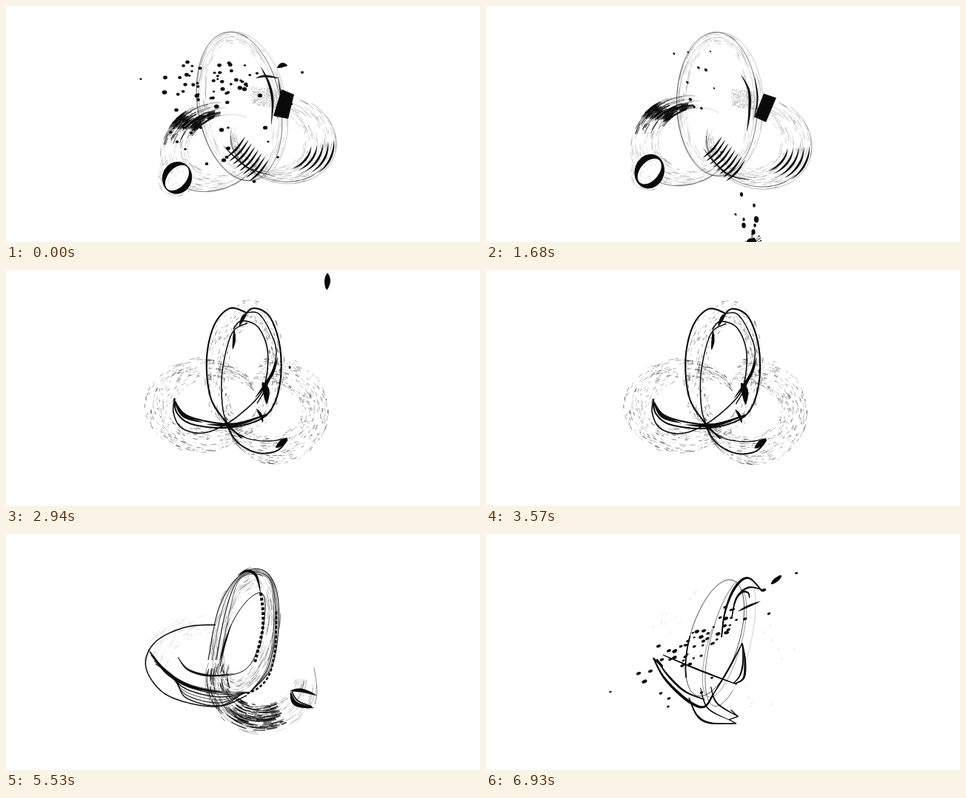
These frames come from a looping animation (640x320 px, 7.07 s). An HTML page with a canvas:

```html
<!DOCTYPE html>
<html lang="en">
<head>
<meta charset="utf-8">
<title>Ink knot</title>
<style>
html, body { margin: 0; width: 100%; height: 100%; overflow: hidden; background: #fff; }
canvas { display: block; width: 640px; height: 320px; }
</style>
</head>
<body>
<canvas id="stage" width="640" height="320"></canvas>
<script>
const ctx = document.getElementById('stage').getContext('2d');
const LOOP = 7070, INK = '#0a0a0a';
// Hold of each drawing in units of 70 ms
const holds = '222223232232222322232222242222232322222322232';
const starts = [];
[...holds].reduce((t, h) => (starts.push(t), t + h * 70), 0);

let seed = 1;
const rnd = () => {
  seed = (seed * 1664525 + 1013904223) >>> 0;
  return seed / 4294967296;
};
const bell = () => (rnd() + rnd() + rnd()) / 1.5 - 1;
const mix = (a, b, u) => a.map((v, i) => v + (b[i] - v) * u);
const rad = d => d * Math.PI / 180;
const pairs = p => p.filter((v, i) => i % 2 === 0).map((v, i) => [v, p[2 * i + 1]]);

// Point of a tilted ellipse [cx, cy, rx, ry, tilt]
function at(e, deg) {
  const a = rad(deg), r = rad(e[4]);
  const x = e[2] * Math.cos(a), y = e[3] * Math.sin(a);
  return [e[0] + x * Math.cos(r) - y * Math.sin(r), e[1] + x * Math.sin(r) + y * Math.cos(r)];
}

function arc(e, a0, a1) {
  const n = Math.max(2, Math.ceil(Math.abs(a1 - a0) / 6)), out = [];
  for (let i = 0; i <= n; i++) out.push(at(e, a0 + (a1 - a0) * i / n));
  return out;
}

// Smooth path through a flat list of coordinates
function spline(p) {
  const pts = pairs(p), n = pts.length, out = [];
  const q = i => pts[Math.min(n - 1, Math.max(0, i))];
  for (let i = 0; i < n - 1; i++) {
    const [a, b, c, d] = [q(i - 1), q(i), q(i + 1), q(i + 2)];
    for (let k = 0; k < 8; k++) {
      const u = k / 8;
      out.push(b.map((v, j) => v + 0.5 * u * (c[j] - a[j] +
        u * (2 * a[j] - 5 * v + 4 * c[j] - d[j] + u * (3 * (v - c[j]) + d[j] - a[j])))));
    }
  }
  out.push(q(n - 1));
  return out;
}

function trace(pts, w, alpha = 1) {
  ctx.globalAlpha = alpha;
  ctx.lineWidth = w;
  ctx.beginPath();
  pts.forEach(p => ctx.lineTo(p[0], p[1]));
  ctx.stroke();
  ctx.globalAlpha = 1;
}
const line = (p, w, alpha) => trace(spline(p), w, alpha);

function fill(pts, color = INK) {
  ctx.fillStyle = color;
  ctx.beginPath();
  pts.forEach(p => ctx.lineTo(p[0], p[1]));
  ctx.fill();
}

// Stroke that swells in the middle
function taper(pts, w) {
  const n = pts.length - 1, left = [], right = [];
  pts.forEach((p, i) => {
    const a = pts[Math.max(0, i - 1)], b = pts[Math.min(n, i + 1)];
    const dx = b[0] - a[0], dy = b[1] - a[1], d = Math.hypot(dx, dy) || 1;
    const h = w / 2 * Math.sin(Math.PI * i / n);
    left.push([p[0] - dy / d * h, p[1] + dx / d * h]);
    right.unshift([p[0] + dy / d * h, p[1] - dx / d * h]);
  });
  fill(left.concat(right));
}
const brush = (p, w) => taper(spline(p), w);

// Short strokes scattered in the band between two ellipses
function hatch(out, inn, a0, a1, n, len, w, alpha, s) {
  seed = s;
  for (let i = 0; i < n; i++) {
    const e = mix(out, inn, rnd()), a = a0 + (a1 - a0) * rnd(), l = len * (0.3 + rnd());
    trace(arc(e, a, a + l), w * (0.5 + rnd()), alpha * (0.4 + 0.6 * rnd()));
  }
}

function ring(e, w, alpha) { trace(arc(e, 0, 360), w, alpha); }

function drop(x, y, r, stretch, ang) {
  ctx.fillStyle = INK;
  ctx.beginPath();
  ctx.ellipse(x, y, r * stretch, r, ang, 0, 7);
  ctx.fill();
}

// Wide ink knot
function inkKnot(t) {
  const u = t / 1050;
  const U = mix([315, 136, 56, 102, -10], [313, 134, 55, 99, -4], u);
  const L = mix([278, 192, 74, 60, -25], [270, 186, 74, 61, -22], u);
  const l = mix([293, 186, 50, 36, -25], [285, 181, 50, 38, -22], u);
  const R = mix([374, 180, 73, 60, 15], [370, 183, 73, 62, 18], u);
  const r = mix([357, 180, 46, 38, 20], [354, 181, 46, 38, 20], u);
  const C = mix([231, 233, 20, 22, 15], [224, 227, 20, 23, 15], u);
  const big = [U[0] + 4, U[1], U[2] + 4, U[3], U[4]];
  const small = [U[0], U[1], U[2] - 14, U[3] - 16, U[4]];

  hatch(L, l, 70, 290, 190, 14, 0.5, 0.42, 5);
  hatch(R, r, -85, 165, 330, 12, 0.5, 0.45, 9);
  hatch(big, small, 0, 360, 210, 12, 0.5, 0.36, 3);
  trace(arc(R, -70, 160), 0.5, 0.55);
  trace(arc(mix(R, r, 0.12), 25, 165), 0.7, 0.75);
  trace(arc(mix(L, l, 0.1), 45, 150), 0.8, 0.7);
  trace(arc(l, 180, 330), 0.4, 0.4);
  ring(U, 0.7, 0.8);
  ring(big, 0.4, 0.55);
  ring([U[0] - 1, U[1] + 3, U[2] - 3, U[3] - 4, U[4] + 2], 0.4, 0.4);

  hatch(L, l, 235, 250, 115, 13, 1.3, 1, 12);
  hatch(L, l, 213, 272, 65, 18, 0.9, 0.9, 21);
  hatch(mix(L, l, 0.55), l, 252, 275, 35, 14, 1.4, 1, 8);

  // Dotted shade and the dark block beside it
  seed = 44;
  ctx.fillStyle = '#999';
  for (let i = 0; i < 520; i++) {
    const x = rnd(), y = rnd();
    ctx.fillRect(331 + x * 36, 109 + x * 4 + y * 25 + u * 2, 0.7, 0.7);
  }
  fill(pairs(mix([372, 113, 389, 120, 381, 153, 361, 149], [374, 117, 391, 123, 379, 156, 362, 150], u)));

  for (let i = 0; i < 5; i++) taper(arc(mix(R, r, 0.08 + i * 0.17), -18 + i * 2, 34 + i * 3), 2.8);
  const dx = -3 * u;
  for (let i = 0; i < 8; i++) {
    const x = 297 + i * 4.5 + dx, y = 204 + i * 4.5;
    brush([x, y + 2, x + 14, y - 10, x + 26, y - 27], 2.8);
  }
  brush([292, 188 + 2 * u, 308, 204 + 5 * u, 330, 221 + 6 * u, 364, 231 + 4 * u], 1.8);
  brush([344, 82 + 7 * u, 355, 105 + 7 * u, 360 - 3 * u, 130 + 10 * u, 358 - 4 * u, 162 + 6 * u], 3.4);
  brush([367 + dx, 96, 371 + dx, 125, 366 + dx, 154], 2);

  hatch([C[0], C[1], 27, 27, 0], C, 0, 360, 45, 20, 0.5, 0.35, 7);
  fill(arc(C, 0, 360));
  const eye = [C[0], C[1], 20, 12.5, -50];
  fill(arc(eye, 0, 360), '#fff');
  hatch(eye, [C[0], C[1], 5, 3, -50], 0, 360, 45, 22, 0.4, 0.4, 6);
}

function pose(keys, t) {
  return t < 4410 ? mix(keys[0], keys[1], (t - 2310) / 2100) : mix(keys[1], keys[2], (t - 4410) / 2520);
}

// Carries points along with a triangle that goes from a to b
function warp(p, a, b) {
  const [ux, uy, vx, vy] = [a[2] - a[0], a[3] - a[1], a[4] - a[0], a[5] - a[1]];
  const det = ux * vy - uy * vx;
  return pairs(p).flatMap(([x, y]) => {
    const dx = x - a[0], dy = y - a[1];
    const m = (dx * vy - dy * vx) / det, n = (ux * dy - uy * dx) / det;
    return [0, 1].map(j => b[j] + m * (b[j + 2] - b[j]) + n * (b[j + 4] - b[j]));
  });
}

// Each part of the contour sketch: a triangle in three poses, and strokes in the first one
function part(keys, strokes) {
  return t => {
    const now = pose(keys, t);
    strokes.forEach(([w, p]) => {
      const q = warp(p, keys[0], now);
      line(q, w * 0.8);
      brush(q, w * 1.4);
    });
  };
}
const hood = part(
  [[297, 155, 303, 48, 349, 53], [303, 150, 320, 52, 358, 62], [318, 140, 346, 62, 373, 78]],
  [[2.4, [297, 155, 289, 115, 291, 75, 303, 48, 320, 41, 349, 53]],
    [2, [305, 115, 302, 85, 310, 68, 322, 65, 328, 72]],
    [1.8, [302, 94, 306, 72, 322, 55, 348, 50]]]);
const leaf = part(
  [[353, 126, 357, 180, 335, 203], [350, 137, 352, 190, 334, 202], [346, 148, 348, 195, 336, 203]],
  [[2.2, [353, 126, 360, 150, 357, 180, 335, 203]], [1.5, [353, 128, 355, 155, 348, 181, 332, 204]]]);
const stemKeys = [[353, 126, 337, 160, 322, 207], [350, 137, 332, 172, 310, 210], [346, 148, 327, 184, 301, 227]];
const stem = part(stemKeys, [[1.6, stemKeys[0]]]);
const browKeys = [[238, 205, 290, 210, 342, 202], [234, 187, 285, 197, 340, 203], [239, 164, 289, 185, 339, 204]];
const brow = part(browKeys, [[1.6, browKeys[0]]]);
const crest = part(
  [[232, 207, 283, 245, 332, 200], [225, 192, 272, 237, 318, 215], [226, 168, 271, 225, 307, 217]],
  [[2.8, [232, 207, 248, 232, 283, 245, 312, 237, 332, 200]],
    [2, [238, 205, 253, 221, 280, 231, 315, 222]], [2, [232, 207, 246, 212, 238, 205]]]);
const tailKeys = [[302, 221, 373, 241, 325, 239], [288, 221, 358, 249, 306, 245], [274, 222, 338, 257, 285, 246]];
const tail = part(tailKeys,
  [[1.4, [316, 205, 336, 222, 369, 233]], [2, [302, 221, 325, 239, 345, 245, 373, 241]],
    [1.2, [306, 208, 330, 229, 361, 238]]]);
const hook = [356, 227, 369, 233, 362, 238, 373, 241];

function sketchKnot(t) {
  const front = pose([[314, 132, 42, 82, 6], [314, 138, 37, 82, 8], [309, 141, 33, 82, 17]], t);
  const back = pose([[336, 135, 37, 91, 9], [335, 138, 33, 92, 10], [330, 146, 27, 90, 14]], t);
  const hole = pose([[328, 138, 27, 76, 6], [327, 140, 24, 75, 8], [322, 148, 22, 76, 16]], t);
  ring(front, 0.8, 0.9);
  trace(arc(front, 130, 175), 1.8);
  trace(arc(back, 45, 245), 0.7, 0.8);
  trace(arc(back, -115, 45), 0.5, 0.4);
  trace(arc(hole, -90, 190), 0.6, 0.7);
  [hood, leaf, stem, brow, crest, tail].forEach(f => f(t));
  trace(pairs(warp(hook, tailKeys[0], pose(tailKeys, t))), 1.4);
  seed = 77;
  for (let i = 0; i < 34; i++) {
    const e = [316, 160, 60 + rnd() * 48, 38 + rnd() * 60, 8], a = rnd() * 360;
    trace(arc(e, a, a + 3), 0.5, 0.25);
  }
  if (t < 2700) {
    brush([330, 238, 335, 252, 338, 270], 5);
    brush([332, 258, 331, 263, 330, 267], 2.5);
    brush([338, 155, 341, 151, 347, 146], 2.4);
  }
}

// Dashed rings under heavy contours
function ringKnot(t) {
  const s = (t - 2940) * -0.0025;
  ctx.save();
  ctx.translate(s, s * -0.5);
  hatch([265, 184, 78, 65, 0], [285, 181, 56, 33, -4], 50, 330, 470, 5, 0.7, 0.65, 31);
  hatch([366, 191, 70, 73, 0], [345, 187, 53, 37, 8], -110, 150, 500, 5, 0.7, 0.65, 32);
  hatch([322, 133, 54, 94, 5], [327, 139, 25, 67, 7], 0, 360, 520, 4, 0.7, 0.65, 33);
  line([325, 58, 302, 52, 281, 75, 271, 120, 276, 172, 296, 205, 318, 228], 2.1);
  line([326, 72, 305, 86, 292, 138, 293, 190, 303, 216], 1.5);
  line([319, 67, 333, 52, 355, 62, 369, 99, 371, 145, 361, 184, 340, 204, 297, 214, 251, 209, 231, 194, 227, 174], 2.1);
  line([307, 80, 318, 69, 340, 77, 353, 108, 351, 148, 339, 174, 302, 206, 266, 221, 237, 214, 226, 193, 228, 174], 1.6);
  line([228, 178, 242, 196, 275, 206, 311, 208, 352, 196], 2.2);
  line([325, 58, 341, 59, 356, 82, 365, 113, 354, 153, 339, 181], 1.4);
  line([296, 207, 313, 234, 340, 248, 366, 245, 380, 230], 1.9);
  line([299, 213, 325, 228, 354, 232, 380, 228], 1.3);
  brush([308, 80, 308, 95, 306, 108], 4);
  brush([325, 58, 320, 65, 315, 76], 5);
  brush([367, 118, 358, 143, 336, 174], 4);
  brush([346, 152, 351, 163, 352, 182], 9);
  brush([338, 188, 344, 197, 347, 207], 4);
  brush([364, 241, 373, 234, 380, 228], 8);
  brush([228, 180, 240, 198, 266, 207], 4);
  brush([270, 209, 308, 210, 350, 197], 4);
  ctx.restore();
}

// Dry brush sweep
function sweepKnot(t) {
  const s = (t - 5530) * -0.003;
  ctx.save();
  ctx.translate(s, 0);
  const B = [345, 200, 77, 73, 0], b = [345, 193, 46, 39, 0];
  hatch([323, 131, 45, 88, 12], [324, 135, 25, 64, 14], 0, 360, 330, 13, 0.55, 0.55, 51);
  hatch([275, 175, 89, 67, 0], [280, 178, 58, 43, 0], 175, 268, 85, 8, 0.5, 0.3, 52);
  hatch(B, b, 0, 190, 190, 14, 0.6, 0.5, 53);
  hatch(mix(B, b, 0.15), b, 60, 125, 160, 15, 1.1, 0.95, 54);
  hatch(B, b, 130, 190, 90, 15, 0.9, 0.9, 55);
  line([283, 123, 244, 126, 207, 142, 190, 165, 192, 190, 215, 217, 255, 231, 292, 233, 325, 219], 1.5);
  for (let i = 0; i < 6; i++) {
    const d = i * 4;
    line([192 + d * 0.5, 156 + d, 208 + d, 179 + d * 0.8, 243, 202 + d, 288, 213 + d, 329 - d * 0.4, 215],
      0.8 + (i % 3) * 0.4, 0.9);
  }
  brush([194, 158, 215, 186, 250, 207, 305, 217], 4.5);
  brush([232, 167, 246, 184, 275, 192, 309, 189], 3);
  line([232, 167, 246, 184, 275, 192, 309, 190, 329, 178, 343, 150], 1);
  for (let i = 0; i < 4; i++) {
    const d = i * 5.3, e = d * 0.4;
    line([273 + d, 171, 286 + d, 105, 307 + e, 65, 332, 48 + e, 354, 54 + e,
      367 - e, 85, 367 - e, 140, 357 - e, 184, 330, 214], i % 2 ? 0.7 : 1.2, 0.9);
  }
  line([289, 179, 303, 126, 325, 91, 345, 80, 350, 103, 343, 153], 1);
  brush([312, 57, 325, 50, 338, 57, 344, 82], 4);
  brush([288, 175, 295, 150, 304, 122], 2.5);
  ctx.setLineDash([4, 2.5]);
  line([344, 80, 347, 105, 346, 132, 336, 174], 4);
  line([365, 105, 364, 150, 357, 187, 343, 207, 324, 217], 2.6);
  ctx.setLineDash([]);
  line([416, 181, 420, 212, 417, 231], 0.7, 0.7);
  brush([383, 213, 399, 212, 420, 219], 5);
  brush([384, 214, 391, 230, 416, 236], 6);
  line([386, 214, 394, 226, 413, 234], 1.6);
  ctx.restore();
}

// Dots strewn around the line from (x0, y0) to (x1, y1)
function strew(n, x0, y0, x1, y1, sx, sy, s) {
  seed = s;
  return Array.from({ length: n }, () => {
    const u = rnd();
    return [x0 + (x1 - x0) * u + bell() * sx, y0 + (y1 - y0) * u + bell() * sy];
  });
}
const burst = strew(46, 235, 104, 330, 102, 22, 40, 17).concat(pairs([182, 99, 400, 90, 372, 82, 245, 76,
  215, 97, 214, 117, 230, 141, 231, 184, 222, 171, 240, 165, 250, 172, 242, 194, 300, 193, 291, 168,
  350, 165, 354, 184, 367, 205, 271, 214, 294, 209, 298, 205, 335, 238, 274, 152, 263, 165, 300, 165]));
const stray = pairs([249, 45, 268, 43, 298, 42, 282, 64, 292, 67, 303, 92, 267, 84, 271, 107,
  276, 117, 286, 119, 313, 179, 332, 263]);
const heavy = pairs([345, 226, 362, 241, 348, 260, 348, 268, 365, 260, 363, 268, 361, 277, 310, 314]);
const rain = strew(22, 345, 105, 308, 165, 22, 20, 28).concat(
  strew(24, 303, 172, 290, 245, 12, 14, 39), pairs([375, 94, 364, 93, 353, 93]));
const gust = strew(46, 240, 182, 345, 110, 24, 28, 63).concat(pairs([168, 214, 419, 53, 382, 108,
  233, 152, 206, 189, 214, 200, 222, 186, 236, 216, 247, 223, 246, 234, 291, 215, 305, 195, 375, 76]));

function cloud(pts, dt, { vx = 0, vy = 0, g = 0, size = 2, stretch = 1.2, ang = 0, life = 1e9 }) {
  seed = 91;
  pts.forEach(([x, y]) => {
    const r = size * (0.6 + rnd() * 0.7), end = life * (0.3 + 0.7 * rnd());
    if (dt < end) drop(x + vx * dt, y + vy * dt + g * dt * dt / 2, r, stretch, ang);
  });
}

function splat(x, y) {
  seed = 15;
  for (let i = 0; i < 30; i++) {
    const a = rnd() * 6.28, d = 6 + rnd() * 11;
    const px = x + Math.cos(a) * d, py = y + Math.sin(a) * d;
    trace([[x, y], [px, py]], 0.6);
    if (i % 3 === 0) drop(px, py, 1, 1, 0);
  }
  for (let i = 0; i < 9; i++) drop(x + (rnd() - 0.5) * 7, y + (rnd() - 0.5) * 12, 4, 1.3, 1.5);
}

function splashes(t) {
  if (t < 1050) {
    cloud(burst, t, { vx: 0.015, g: 4e-4, size: 2.2, life: 1000 });
    if (t < 280) {
      brush([337, 98, 350, 95, 369, 98], 3);
      brush([366, 84, 373, 80, 380, 81], 6);
      brush([370, 130, 379, 132, 388, 133], 6);
    }
  }
  if (t >= 840 && t < 1890) {
    const dt = t - 1050;
    cloud(stray, dt, { vx: 0.01, vy: 0.04, size: 1.5, stretch: 1.4, ang: 0.7 });
    cloud(heavy, dt, { vy: 0.06, size: 2.7, stretch: 1.4, ang: 1.5 });
    splat(358, 295 + dt * 0.06);
  }
  if (t >= 2660 && t < 3150) {
    const dt = t - 2940, x = 434 + dt * 0.02, y = 15 - dt * 0.12;
    brush([x, y - 11, x, y, x - 1, y + 12], 8);
    drop(383, 132 - dt * 0.04, 1.3, 1.5, 1.5);
  }
  if (t >= 4130 && t < 5040) {
    const dt = t - 4410;
    cloud(rain, dt, { vx: -0.01, vy: 0.09, size: 1.15, stretch: 1.8, ang: 2.1 });
    drop(297, 276 + dt * 0.1, 2.7, 2.8, 1.6);
    drop(314, 288 + dt * 0.1, 2.2, 2.3, 1.6);
  }
  if (t >= 6090) {
    const dt = t - 6930;
    cloud(gust, dt, { vx: 0.055, vy: -0.035, size: 1.8, stretch: 1.6, ang: -0.4 });
    drop(392 + dt * 0.055, 62 - dt * 0.04, 2.8, 3.2, -0.7);
    brush([340, 105, 354, 98, 371, 91], 3);
  }
}

function draw(t) {
  ctx.fillStyle = '#fff';
  ctx.fillRect(0, 0, 640, 320);
  ctx.strokeStyle = INK;
  if (t < 1890) inkKnot(t);
  else if (t >= 2660 && t < 4130) ringKnot(t);
  else if (t >= 5180 && t < 6300) sweepKnot(t);
  else sketchKnot(t);
  splashes(t);
}

const begin = performance.now();
let shown = -1;
function tick() {
  const t = Math.max(0, performance.now() - begin) % LOOP;
  const now = starts.filter(s => s <= t).pop();
  if (now !== shown) draw(shown = now);
  requestAnimationFrame(tick);
}
tick();
</script>
</body>
</html>
```
